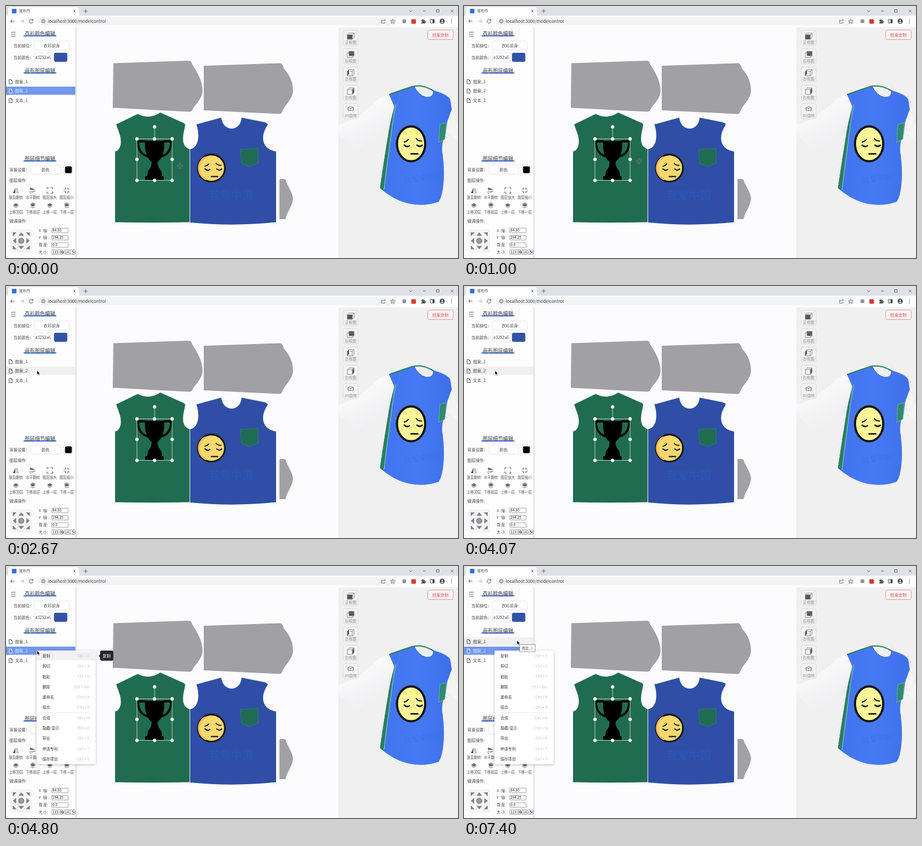
An HTML page that plays this animation: 800 px wide and 447 px high, repeating every 8000 ms.

```html
<!DOCTYPE html>
<html lang="zh">
<head>
<meta charset="utf-8">
<title>Shirt editor</title>
<style>
html, body { margin: 0; width: 100%; height: 100%; overflow: hidden; background: #fcfbfd; }
svg { display: block; width: 100%; height: 100%; }
text { font-family: "Noto Sans CJK SC", "Noto Sans CJK", "Noto Sans", sans-serif; white-space: pre; }
.line { fill: none; stroke: #555; stroke-width: 1; }
.box { fill: #fff; stroke: #dddfe4; stroke-width: .8; }
.grip circle { fill: #fff; stroke: #d5dcd9; stroke-width: .5; }

.timed { animation: 8s step-end infinite; }
#selected { animation-name: selected; }
#hover2 { animation-name: hover2; }
#hover1 { animation-name: hover1; }
#menu { animation-name: menu; }
#menuHover { animation-name: menu-hover; }
#tip { animation: tip 8s linear infinite; }
#title { animation-name: title; }
#pointer { animation: pointer 8s linear infinite; }
#move { animation-name: move; }
#arrow { animation-name: arrow; }

@keyframes selected { 0% { opacity: 1 } 1% { opacity: 0 } 51.6%, 100% { opacity: 1 } }
@keyframes hover2 { 0% { opacity: 0 } 19.5% { opacity: 1 } 51.6%, 100% { opacity: 0 } }
@keyframes hover1 { 0% { opacity: 0 } 85.5%, 100% { opacity: 1 } }
@keyframes menu { 0% { opacity: 0 } 51.6%, 100% { opacity: 1 } }
@keyframes menu-hover { 0% { opacity: 1 } 83.4%, 100% { opacity: 0 } }
@keyframes tip { 0%, 54% { opacity: 0 } 56.5%, 83.4% { opacity: 1 } 85.5%, 100% { opacity: 0 } }
@keyframes title { 0% { opacity: 0 } 92.5%, 100% { opacity: 1 } }
@keyframes move { 0% { opacity: 1 } 16.5%, 100% { opacity: 0 } }
@keyframes arrow { 0% { opacity: 0 } 16.5%, 100% { opacity: 1 } }
@keyframes pointer {
  0%, .9% { transform: translate(308px, 283px) }
  10.9%, 12.4% { transform: translate(310px, 275px); animation-timing-function: ease-in-out }
  20.8%, 24.1% { transform: translate(50px, 151px) }
  26.6%, 31.6% { transform: translate(52px, 151px) }
  33.3%, 83.4% { transform: translate(55px, 150px); animation-timing-function: ease-in-out }
  89.1%, 100% { transform: translate(94px, 132px) }
}
</style>
</head>
<body>
<svg id="stage" viewBox="0 0 800 447" preserveAspectRatio="none"></svg>
<script>
const text = (x, y, s, size = 7.2, fill = '#444', anchor = 'start') =>
  `<text x="${x}" y="${y}" dy=".36em" font-size="${size}" fill="${fill}" text-anchor="${anchor}">${s}</text>`;
const mid = (x, y, s, size, fill) => text(x, y, s, size, fill, 'middle');
const rect = (x, y, w, h, fill, r = 0) =>
  `<rect x="${x}" y="${y}" width="${w}" height="${h}" rx="${r}" fill="${fill}"/>`;
const box = (x, y, w, h, r = 3) => `<rect class="box" x="${x}" y="${y}" width="${w}" height="${h}" rx="${r}"/>`;
const shape = (d, fill, extra = '') => `<path d="${d}" fill="${fill}" ${extra}/>`;
const line = (d, stroke = '#555', w = 1) => `<path class="line" d="${d}" style="stroke:${stroke};stroke-width:${w}"/>`;
const dot = (x, y, r, fill) => `<circle cx="${x}" cy="${y}" r="${r}" fill="${fill}"/>`;
const at = (x, y, body, more = '') => `<g transform="translate(${x} ${y})${more}">${body}</g>`;
const timed = (id, body) => `<g id="${id}" class="timed">${body}</g>`;

function browser() {
  return rect(0, 0, 800, 18, '#dee1e6') + rect(0, 17.5, 800, 20, '#fff') +
    shape('M1 18Q4 18 4 14V6Q4 2 8 2H125Q129 2 129 6V14Q129 18 132 18Z', '#fff') +
    rect(10.5, 5, 8, 8, '#2f6fe0', 1) + text(23, 9, '棠布作', 6.6, '#555') +
    line('M119 7l4 4m0-4l-4 4M137.5 9h7m-3.5-3.5v7', '#555', .9) +
    line('M713.5 7.5l2.8 2.8 2.8-2.8M738 9h5M762 6.5h4.5v4.5h-4.5zM787 6.5l5 5m0-5l-5 5', '#444', .8) +
    line('M15 27H8m3-3-3 3 3 3', '#555') + line('M25 27h7m-3-3 3 3-3 3', '#aaa') +
    line('M47.3 25a3.5 3.5 0 1 0 .6 2.5M47.8 23v2.5h-2.5', '#555') +
    rect(56, 20, 636, 14.5, '#f1f3f4', 7.2) +
    '<circle class="line" cx="66" cy="27" r="3"/>' + line('M66 26.5v2.2M66 25v.7', '#555', .9) +
    text(74, 27, 'localhost:3000/modelcontrol', 7.6, '#444') +
    line('M667 25h-2.5v5.5h6v-2M666.5 28q0-3 4.5-3m-1.5-1.8 2 1.8-2 1.8', '#666', .8) +
    line('M684.5 23.5l1.2 2.5 2.8.3-2.1 1.9.6 2.8-2.5-1.4-2.5 1.4.6-2.8-2.1-1.9 2.8-.3z', '#555', .8) +
    dot(705, 27, 3.6, '#8b9299') + rect(717.5, 23.5, 8, 8, '#d8362f', 1) +
    shape('M735 25h2q-.5-2 1-2t1 2h2.5v2.2q2-.5 2 1t-2 1V31h-6.5v-2q1.8 0 1.8-1t-1.8-1z', '#555') +
    line('M751 24h7v6h-7z', '#444') + rect(755, 24, 3, 6, '#444') +
    dot(772, 27, 4.5, '#3c4650') + dot(772, 25.7, 1.5, '#fff') + shape('M769 30q3-4 6 0z', '#fff') +
    [24, 27, 30].map(y => dot(788.5, y, .8, '#555')).join('');
}

const heading = (y, s) => rect(31, y + 2.5, 58, 2.7, '#5a88ea') + mid(60, y, s, 9, '#3c3c40');

function layer(y, name, fill = '#444') {
  return line(`M5.5 ${y - 3.5}h3.5l2 2v5.5h-5.5zM9 ${y - 3.5}v2h2`, fill, .9) + text(16, y, name, 7.2, fill);
}

function tools() {
  const names = ['垂直翻转', '水平翻转', '图层放大', '图层缩小', '上移顶层', '下移底层', '上移一层', '下移一层'];
  const stack = up => shape('M-5 0 0-3 5 0 0 3z', '#666') +
    (up ? line('M-4 2.5 0 4.7 4 2.5', '#777') : line('M-4-2 0-4 4-2M-4 3 0 5 4 3', '#777'));
  const icons = [
    shape('M-1-5V5H-5z', '#555') + line('M1.5-4 5 4.5H1.5z', '#777', .8),
    shape('M-5-1 5-1-5-5z', '#555') + line('M-5 1.5H4l-9 4z', '#777', .8),
    line('M-5-2v-3h3M2-5h3v3M5 2v3H2M-2 5h-3V2', '#555'),
    line('M-5-2h3v-3M2-5v3h3M5 2H2v3M-2 5V2h-3', '#666'),
    stack(true), stack(false), stack(true), stack(false)
  ];
  return names.map((name, i) => {
    const x = 17.5 + i % 4 * 30, y = i < 4 ? 327 : 353;
    return at(x, y, icons[i]) + mid(x, y + 13, name, 6.3, '#555');
  }).join('');
}

function pad() {
  const gray = '#818186';
  let out = rect(8, 396, 38, 42, '#f5f5f7', 4);
  for (const turn of [0, 90, 180, 270]) {
    const arrows = shape('M-5-9H5L0-15Z', gray) + shape('M-15-15H-8L-15-8Z', gray);
    out += at(27, 416.5, arrows, ` rotate(${turn})`);
  }
  return out + '<circle cx="27" cy="416.5" r="4.5" fill="#9a9a9f" stroke="#818186" stroke-width="1.6"/>';
}

function field(x, y, w, value) {
  return `<rect x="${x}" y="${y - 4}" width="${w}" height="8" rx="1" fill="#fff" stroke="#777" stroke-width=".7"/>` +
    text(x + 1.3, y, value, 6.3, '#222');
}

function sidebar() {
  return rect(0, 37.5, 123, 410, '#fdfdfe') +
    line('M9 46.5h8M9 50h8M9 53.5h8', '#666') +
    heading(49, '衣衫颜色编辑') +
    text(13, 70, '当前部位：') + box(50, 62, 62, 16) + mid(81, 70, '衣衫前身') +
    text(13, 91, '当前颜色：') + box(50, 83, 33, 16) + text(52, 91, '#3252a6', 7) + rect(85, 83, 23.5, 16, '#3252a6', 3) +
    heading(115, '画布图层编辑') +
    timed('hover1', rect(0, 126.5, 123, 15, '#f0f0f2')) +
    timed('hover2', rect(0, 143, 123, 14.5, '#f0f0f2')) +
    layer(134, '图案_1') + layer(150.5, '图案_2') + layer(167.5, '文本_1') +
    timed('selected', rect(0, 143, 123, 14.5, '#7397ec') + layer(150.5, '图案_2', '#e8efff')) +
    heading(271, '图层细节编辑') +
    text(6, 290.5, '背景设置：') + box(44, 282, 53, 16) + mid(70, 290.5, '颜色') +
    box(102, 282.5, 16, 16, 2) + rect(104.5, 284.5, 12, 12, '#000', 2) +
    text(6, 309, '图层操作:') + tools() + text(6, 381.5, '微调操作:') + pad() +
    text(58, 398.5, 'X   轴:', 6.5) + field(81, 398, 29, '84.50') +
    text(58, 411, 'Y   轴:', 6.5) + field(81, 411, 29, '294.25') +
    text(58, 424, '角 度:', 6.5) + field(81, 424, 29, '0.0') +
    text(58, 436.5, '大 小:', 6.5) + field(81, 436.5, 19, '119.00') + text(100, 436.5, 'x', 6) + field(103, 436.5, 20, '141.50') +
    rect(122.7, 37.5, 2.3, 410, '#dfe0e4');
}

const BROWS = 'M-12-3Q-7-4-4-8M8-9Q12-4 18-5';
const EYES = 'M-12 1Q-7 6-2 2M9 1Q14 6 19 1';
const face = w => line(BROWS, '#111', w * .8) + line(EYES, '#111', w) + line('M-1 15H12', '#111', w);

function trophy() {
  const grips = [231.8, 263, 294].flatMap(x => [235.7, 272, 309.3].map(y => [x, y]))
    .filter(([x, y]) => x !== 263 || y !== 272).concat([[263, 214.3]]);
  return shape('M246 239H280C281 256 277 270 268 277Q268 286 275 293L276 301 279 303V308.5H246V303L250 301 251 293Q258 286 258 277C249 270 245 256 246 239Z', '#000') +
    line('M247 240H234C233 255 240 265 253 267M279 240H292C293 255 286 265 273 267', '#000', 3.8) +
    line('M231.8 235.7H294V309.3H231.8ZM263 235.7V214.3', '#dfe9e5', .8) +
    `<g class="grip">${grips.map(([x, y]) => dot(x, y, 2.9)).join('')}</g>`;
}

function pattern() {
  const gray = '#a1a0a4', green = '#206c51';
  return rect(125, 37.5, 463, 410, '#fcfbfd') +
    shape('M190 101.5 323 97Q328 97 329 102C334 112 348 129 348 151C347 166 333 176 330 184Q328 188 323 187.5L189 180.5Z', gray) +
    shape('M350 106 484 101.5Q488 101 490 106Q491 111 495 115C502 123 508 135 508 150C507 166 493 176 489 187Q488 192 483 191.5L350 185Z', gray) +
    shape('M484 307.5Q490 306 495 308C496 317 507 328 508 342C507 356 496 367 495 378H484Z', gray) +
    shape('M195 210 233 191.5Q254 202 273 189L311 206Q318 208 317 212L314 227C312 241 314 250 325 254V383.5Q258 385 193 383.5V258C203 256 205 243 202 230Z', green) +
    shape('M337 210 381 198C384 224 415 224 417 198L457 206Q464 208 463 211C449 232 453 254 478 258V383.5Q403 391.5 326 384V254C340 251 344 232 337 210Z', '#2e4fa5') +
    line('M325.3 254V384', '#cfd9e6', .8) + trophy() +
    '<circle cx="363.5" cy="287.5" r="24" fill="#f8d970" stroke="#17130d" stroke-width="3"/>' +
    line('M353 268A22 22 0 0 0 355 308', '#f2b75a', 3) + dot(369, 264, 1.5, '#17130d') +
    at(363.5, 287.5, face(2.2)) +
    shape('M415 254.5 445.5 252.5 447 278 431.5 285 417 279.5Z', green, 'stroke="#3d7f8c" stroke-width=".9" stroke-dasharray="2 1"') +
    text(359, 336, '我爱中国', 19.5, '#2c57bd');
}

function cube(x, y, side) {
  const sides = { front: 'M-6-2H3V6H-6Z', back: 'M-3-5H6V3H-3Z', left: 'M-6-2-3-5V3L-6 6Z', right: 'M3-2 6-5V3L3 6Z' };
  return at(x, y, shape(sides[side], '#555') + line('M-6-2H3V6H-6ZM-6-2-3-5H6V3L3 6M3-2 6-5', '#777', .8));
}

function viewButtons() {
  const views = [['正视图', 'front'], ['后视图', 'back'], ['左视图', 'left'], ['右视图', 'right'], ['3D旋转']];
  return views.map(([name, side], i) => {
    const y = 43 + i * 32.5;
    const icon = side ? cube(610, y + 10, side) :
      at(610, y + 9, line('M0-4 4-2V2L0 4-4 2V-2ZM-4-2 0 0 4-2M0 0V4M-4-3A6 6 0 0 0-3 5M4-3A6 6 0 0 1 3 5', '#777', .8));
    return `<rect x="597" y="${y}" width="26" height="27" rx="3" fill="#f3f3f4" stroke="#d6d6da" stroke-width=".8"/>` +
      icon + mid(610, y + 22, name, 6.8, '#888');
  }).join('');
}

function model() {
  return rect(588, 37.5, 212, 410, '#f0f0f1') +
    shape('M680 154 661 163C640 186 611 205 588 211V228C602 241 616 250 629 260C646 251 667 219 690 190Z', 'url(#sleeve)') +
    shape('M788 182 800 214V242L779 220Z', '#f4f4f5') +
    shape('M678 157Q700 149 722 142Q742 141 758 150Q780 156 786 165L789 183 781 205 778 228Q771 240 772 258Q777 290 774 318Q772 338 766 347Q745 355 722 352Q690 348 662 323Q668 283 675 238Q680 200 688 180Z', 'url(#cloth)') +
    shape('M688 176Q680 205 675 238Q667 285 662 323L669 327Q674 284 680 240Q684 204 690 172Z', '#26815c') +
    line('M690 174Q684 204 680 240Q674 284 669 326', '#c9dcf0', .8) +
    line('M678 157Q700 149 722 142', '#26815c', 2) +
    shape('M722 142Q742 140 757 151Q756 163 744 162Q730 158 722 142Z', '#efeff1') +
    line('M722 142Q742 140 757 151', '#26815c', 2) + line('M722 142Q730 159 744 162Q756 163 757 151', '#3160d4', 1) +
    shape('M768 210 779 207 777 236 766 242Z', '#2d8b68', 'stroke="#a8d4d0" stroke-width=".7" stroke-dasharray="2 1"') +
    '<ellipse cx="717" cy="244.5" rx="25" ry="31" fill="#fbf698" stroke="#14130f" stroke-width="3.8"/>' +
    at(717, 245, face(2.3), ' scale(1.08 1.15)') +
    at(704, 310, text(0, 0, '我爱中国', 14, '#4071ea'), ' rotate(-8)') +
    viewButtons() +
    '<rect x="746.5" y="42.5" width="45" height="17" rx="3" fill="#fbf4f4" stroke="#e58b8b" stroke-width=".9"/>' +
    mid(769, 51, '结束定制', 7.3, '#dd5757');
}

function menu() {
  const items = [['复制', 'C'], ['剪切', 'X'], ['粘贴', 'V'], ['删除', 'Del'], ['重命名', 'R'], ['组合', 'B'],
    ['合成', 'M'], ['隐藏/显示', 'H'], ['导出', 'E'], ['申请专利', 'T'], ['保存项目', 'S']];
  const rows = items.map(([name, key], i) => {
    const y = 159.5 + i * 18.3;
    return text(64.5, y, name, 6.8, '#333') + text(148, y, 'Ctrl + ' + key, 6.6, '#bfc0c5', 'end');
  }).join('');
  return timed('menu', `<rect x="54" y="150" width="104.5" height="201.5" rx="2" fill="#fff" filter="url(#shadow)"/>` +
    timed('menuHover', rect(54, 151.5, 104.5, 16, '#f1f1f3')) + line('M65 260.2H148', '#e3e3e7', .8) + rows) +
    `<g id="tip">${rect(166.5, 150, 23.5, 18, '#26272b', 3)}${shape('M167 156.5 164 159.5 167 162.5Z', '#26272b')}${mid(178.3, 159.3, '复制', 7.2, '#fff')}</g>` +
    timed('title', `<rect x="98.5" y="139.5" width="27.5" height="12.5" fill="#fff" stroke="#777" stroke-width=".8"/>` + mid(112.2, 145.7, '图案_1', 6, '#555'));
}

function pointer() {
  const cross = 'M-3.5 0H3.5M0-3.5V3.5M-1.5-2.5 0-4 1.5-2.5M-1.5 2.5 0 4 1.5 2.5M-2.5-1.5-4 0-2.5 1.5M2.5-1.5 4 0 2.5 1.5';
  return `<g id="pointer">${timed('move', line(cross, '#ffffff90', 1.7) + line(cross, '#222', .9))}` +
    timed('arrow', shape('M0 0V7.5L1.7 6 3 8.8 4.3 8.2 3 5.5H5.2Z', '#000', 'stroke="#fff" stroke-width=".5"')) + '</g>';
}

const defs = `<defs>
  <filter id="shadow" x="-10%" y="-10%" width="120%" height="120%"><feDropShadow dx="0" dy="1" stdDeviation="2" flood-opacity=".3"/></filter>
  <linearGradient id="sleeve" x1="0" y1="0" x2=".5" y2="1"><stop offset=".4" stop-color="#f8f8f9"/><stop offset="1" stop-color="#eeeef0"/></linearGradient>
  <linearGradient id="cloth"><stop stop-color="#4073ee"/><stop offset=".5" stop-color="#467af5"/><stop offset="1" stop-color="#3d6fe8"/></linearGradient>
</defs>`;

document.getElementById('stage').innerHTML =
  defs + pattern() + model() + sidebar() + browser() + menu() + pointer();
</script>
</body>
</html>
```
